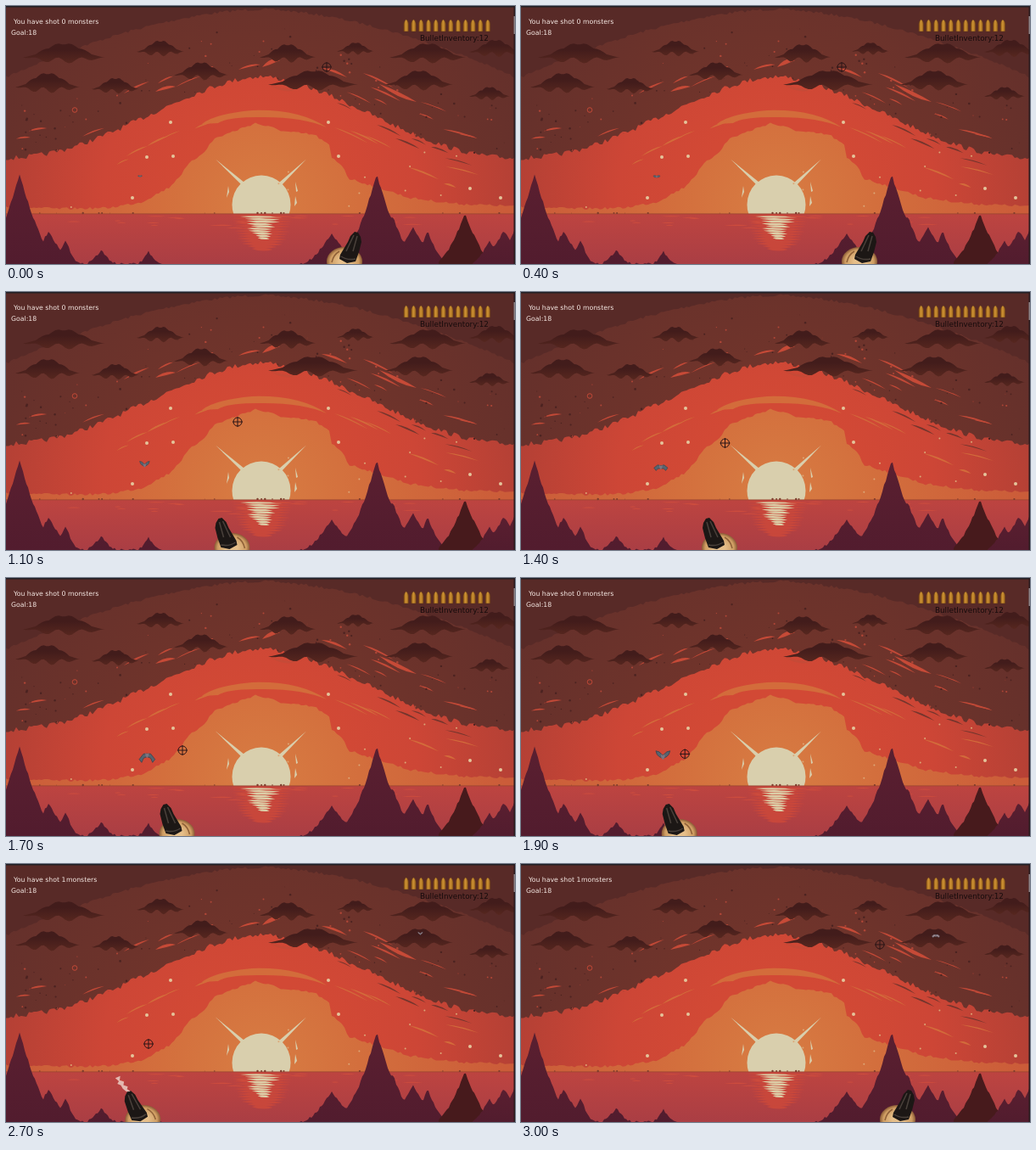
An HTML page that plays this animation: 600 px wide and 304 px high, repeating every 3.1 s.

```html
<!DOCTYPE html>
<html lang="en">
<head>
<meta charset="utf-8">
<title>Sunset shooting game</title>
<style>
html,body{margin:0;width:100%;height:100%;overflow:hidden;background:#5a2c28}
svg{display:block;width:600px;height:304px}
text{font-family:"DejaVu Sans",sans-serif;font-size:7.75px;white-space:pre}
</style>
</head>
<body>
<svg id="stage" viewBox="0 0 600 304">
<defs>
  <radialGradient id="red" gradientUnits="userSpaceOnUse" cx="300" cy="225" r="310">
    <stop offset=".3" stop-color="#d24935"/><stop offset=".6" stop-color="#cd4636"/><stop offset="1" stop-color="#b34035"/>
  </radialGradient>
  <radialGradient id="brown" gradientUnits="userSpaceOnUse" cx="300" cy="225" r="350">
    <stop offset=".4" stop-color="#70342b"/><stop offset="1" stop-color="#64302b"/>
  </radialGradient>
  <radialGradient id="orange" gradientUnits="userSpaceOnUse" cx="300" cy="240" r="290">
    <stop offset="0" stop-color="#d87d43"/><stop offset=".4" stop-color="#d36f3d"/><stop offset="1" stop-color="#cb5c39"/>
  </radialGradient>
  <linearGradient id="sea" x2="0" y2="1">
    <stop offset="0" stop-color="#bd4440"/><stop offset="1" stop-color="#aa3e44"/>
  </linearGradient>
  <linearGradient id="rock" x2="0" y2="1">
    <stop offset="0" stop-color="#5a1f30"/><stop offset="1" stop-color="#521c2e"/>
  </linearGradient>
  <linearGradient id="cloud" x2="0" y2="1">
    <stop offset=".3" stop-color="#421c1b"/><stop offset="1" stop-color="#57271f"/>
  </linearGradient>
  <linearGradient id="brass">
    <stop offset="0" stop-color="#8a5216"/><stop offset=".45" stop-color="#cf9433"/><stop offset="1" stop-color="#98601b"/>
  </linearGradient>
  <radialGradient id="skin">
    <stop offset=".3" stop-color="#e6bf8a"/><stop offset=".8" stop-color="#cf9d62"/><stop offset="1" stop-color="#8a5a35"/>
  </radialGradient>
  <clipPath id="sky"><rect width="600" height="245"/></clipPath>
</defs>
<rect width="600" height="304" fill="#582a27"/>
<g id="scene"></g>
<g id="bat">
  <path id="wings" stroke="#3d444f" stroke-width=".05"/>
  <path d="M-.12-.14L-.05-.06H.05L.12-.14L.12.08L0 .24L-.12.08Z" fill="#7b7580"/>
</g>
<g id="gun">
  <ellipse cx="-1" cy="-3" rx="21" ry="17" fill="url(#skin)"/>
  <path d="M5-15Q12-11 14-2" fill="none" stroke="#8f6038" stroke-width="1.5"/>
  <path d="M-20-32L-17-37L-13-38L-8-33L-5-26L4-11L5-6L-4-1L-14-3L-18-14L-21-26Z" fill="#1c1715"/>
  <path d="M-16-33L-11-15M-12-34L-3-15M-14-6Q-4-4 3-9" fill="none" stroke="#4a413b" stroke-width="1.5"/>
  <path id="smoke" d="M-18-37L-22-41L-24-45L-28-47L-26-50L-30-54L-24-56L-25-51L-20-49L-21-45L-16-43L-17-40L-13-37Z" fill="#e3b9b0"/>
</g>
<g id="aim" fill="none" stroke="#2b1516">
  <circle r="5"/><path d="M-6 0H6M0-6V6"/>
</g>
<g id="ammo"></g>
<text x="9" y="20.5" fill="#f6e9e4">You have shot <tspan id="score">0</tspan><tspan id="unit"> monsters</tspan></text>
<text x="6" y="33.5" fill="#f6e9e4">Goal:18</text>
<text x="488" y="40.5" fill="#180c0d" style="font-size:8.8px">BulletInventory:12</text>
<rect width="600" height="1.5" fill="#202026"/>
<rect x="598.5" width="1.5" height="304" fill="#2b1b1e"/>
<rect x="598.5" y="12" width="1.5" height="21" fill="#8d8285"/>
</svg>
<script>
const $ = id => document.getElementById(id);
const NS = "http://www.w3.org/2000/svg";

function add(tag, attrs, parent = $("scene")) {
  const el = document.createElementNS(NS, tag);
  for (const k in attrs) el.setAttribute(k, attrs[k]);
  return parent.appendChild(el);
}

let seed = 7;
const rnd = () => (seed = (seed * 16807) % 2147483647) / 2147483647;
const between = (a, b) => a + (b - a) * rnd();
const pairs = s => s.split(" ").map(p => p.split(",").map(Number));
const repeat = (n, fn) => { for (let i = 0; i < n; i++) fn(i); };

const poly = (pts, fill) =>
  add("path", {d: "M" + pts.map(p => p.map(v => v.toFixed(1)).join(" ")).join("L") + "Z", fill});
const dot = (x, y, r, fill) => add("circle", {cx: x.toFixed(1), cy: y.toFixed(1), r: r.toFixed(1), fill});

// Area under y(x), closed at the given floor
function under(y, x0, x1, floor, jag, fill, step = 3) {
  const pts = [[x0, floor]];
  for (let x = x0; x <= x1; x += step) pts.push([x, Math.min(floor, y(x) + between(-jag, jag))]);
  pts.push([x1, floor]);
  poly(pts, fill);
}

// Tapered curved stroke
function streak(x, y, u, v, w, fill, bend = 0) {
  const mx = (x + u) / 2, my = (y + v) / 2 + bend;
  add("path", {d: `M${x} ${y}Q${mx} ${my - w} ${u} ${v}Q${mx} ${my + w} ${x} ${y}Z`, fill});
}

const edge = x => 83 + 96 * Math.pow(Math.abs(Math.sin((x - 300) / 600 * Math.PI)), 1.65);

// Streaks that follow the arch, shifted up or down from its edge
function drift(n, x0, x1, lo, hi, fill) {
  repeat(n, () => {
    const x = between(x0, x1), u = x + between(14, 40), off = between(lo, hi);
    streak(x, edge(x) + off, u, edge(u) + off, between(1, 2.5), fill, -2);
  });
}

function cloud(x, y, w) {
  const top = [], base = [], h = Math.min(w, 72);
  for (let k = -1; k <= 1; k += .08) {
    const bell = Math.cos(k * Math.PI / 2);
    top.push([x + k * w / 2, y + h * (.05 - .2 * bell * bell - .04 * bell * Math.abs(Math.sin(k * 9)))]);
    base.unshift([x + k * w / 2, y + h * (.05 + .05 * bell * (1 + Math.sin(k * 11)))]);
  }
  poly(top.concat(base), "url(#cloud)");
}

function drawSky() {
  under(x => 4 + 80 * Math.pow(Math.abs(x - 300) / 300, 1.7), 0, 600, 245, 1.5, "url(#brown)");
  under(edge, 0, 600, 245, 3, "url(#red)");

  const glow = pairs("0,236 60,239 120,238 160,231 192,214 206,199 216,186 234,171 246,156 270,147 294,138 330,148 364,152 382,165 381,177 398,189 403,203 440,214 475,226 530,233 600,236");
  under(x => {
    const i = Math.max(1, glow.findIndex(p => p[0] >= x));
    const [a, b] = glow[i - 1], [c, d] = glow[i];
    return b + (d - b) * (x - a) / (c - a);
  }, 0, 600, 245, 1.5, "url(#orange)");

  add("path", {d: "M231 139Q246 127 290 123Q345 121 378 143Q350 131 305 131Q262 130 250 138Z", fill: "#d36c3b"});
  drift(5, 90, 230, 20, 45, "#d36c3b");
  drift(6, 380, 560, 22, 50, "#d36c3b");
  drift(6, 10, 200, -45, -8, "#c24937");
  drift(8, 400, 560, -45, -6, "#c24937");
  drift(6, 390, 560, 4, 16, "#74352d");

  streak(302, 72, 323, 64, 5, "#c64a37", -4);
  streak(274, 75, 300, 69, 2.5, "#c64a37", -3);
  streak(372, 73, 402, 84, 3, "#c64a37", -3);
  streak(440, 92, 484, 113, 5, "#c64a37", 2);
  streak(176, 101, 200, 95, 3.5, "#c64a37", -3);
  streak(312, 94, 343, 99, 3, "#c64a37", 4);
  add("circle", {cx: 81, cy: 122.5, r: 2.8, fill: "none", stroke: "#c24937"});

  repeat(110, i => {
    const x = between(0, 596);
    dot(x, edge(x) - between(0, 65), between(.4, 1.3), i % 3 ? "#4b2321" : "#b04637");
  });
  pairs("68,97 182,56 332,66 412,44 497,90 577,62").forEach(([x, w], i) => cloud(x, i % 2 ? 51 : 57, w));
  pairs("49,76 129,56 230,64 362,106 487,80 570,48").forEach(([x, w], i) => cloud(x, [92, 95, 78, 89, 89, 104][i], w));
}

function drawSun() {
  add("circle", {cx: 301, cy: 234, r: 34.5, fill: "#d9cfad", "clip-path": "url(#sky)"});
  add("path", {d: "M247 180.5L281 208L278 211ZM354 180.5L322 208L325 211ZM341 207L344 218L342 219ZM262 212L263 219L260 226ZM341 224L343 232L340 236Z", fill: "#d9cfad"});
  pairs("194,137 380,137 166,178 197,177 392,177 149,226 547,215 583,226")
    .forEach(([x, y]) => dot(x, y, 2, "#e4c59b"));
  repeat(12, () => dot(between(70, 560), between(165, 240), 1, "#dca878"));
}

function drawSea() {
  add("rect", {y: 245, width: 600, height: 59, fill: "url(#sea)"});
  add("rect", {y: 244.5, width: 600, height: .8, fill: "#98422f"});
  repeat(22, () => dot(between(0, 596), 244, between(.4, 1.2), "#7d3b2c"));
  repeat(14, i => {
    const half = 38 * Math.sqrt(1 - i * i / 196) * between(.85, 1.05);
    streak(302 - half, 247 + i * 3, 302 + half, 248 + i * 3, 4, "#c8473b");
  });
  repeat(10, i => {
    const half = between(.7, 1.1) * (24 - i * 1.8), x = 303 + between(-5, 5);
    streak(x - half, 248 + i * 2.8, x + half, 249 + i * 2.8, 2.6, "#dccda6");
  });
  repeat(26, () => {
    const x = between(70, 520), y = 247 + 18 * rnd() * rnd();
    streak(x, y, x + between(8, 28), y, 1, "#cf4e3e");
  });
}

// Skyline made of pointed peaks: [x, height, half width]
function ridge(peaks, x0, x1, fill) {
  const high = x => Math.max(...peaks.map(([c, h, w]) => h * Math.pow(Math.max(0, 1 - Math.abs(x - c) / w), 1.6)));
  under(x => 304 - high(x), x0, x1, 304, 1.5, fill, 2);
}

function drawRocks() {
  ridge(pairs("16,106,48 50,38,34 70,28,18 112,16,20 168,15,14"), 0, 184, "url(#rock)");
  ridge(pairs("437,106,48 455,58,34 418,46,36 384,37,36 480,44,34 497,38,24"), 346, 522, "url(#rock)");
  ridge(pairs("541,59,36"), 510, 570, "#471a1c");
  ridge(pairs("570,27,24 587,40,32 600,42,30"), 550, 600, "url(#rock)");
}

drawSky(); drawSun(); drawSea(); drawRocks();

const bullets = Array.from({length: 12}, (_, i) => {
  const x = 468.9 + i * 8.75;
  return add("path", {d: `M${x} 30V21Q${x + .6} 17 ${x + 2.8} 16Q${x + 5} 17 ${x + 5.6} 21V30Z`,
    fill: "url(#brass)", stroke: "#5d3418", "stroke-width": .5}, $("ammo"));
});

const SHOT = 2500, SPENT = 2900, LOOP = 3100;

// time, x, y of the crosshair
const track = [[0, 378, 72], [700, 378, 72], [1100, 273, 153], [1700, 208, 203],
               [2200, 171, 214], [2700, 168, 212], [3000, 423, 95], [LOOP, 423, 95]];

function aimAt(t) {
  const i = track.findIndex(k => k[0] > t);
  const [a, x, y] = track[i - 1], [b, u, v] = track[i];
  const f = (t - a) / (b - a);
  return [x + (u - x) * f, y + (v - y) * f];
}

function drawBat(t, hit) {
  const age = (hit ? t - SHOT : t) / 1000;
  const x = hit ? 488 + age * 2 : 158 + age * 4.9;
  const y = hit ? 81 + age * 6 : 200.5 + 2.6 * age * age;
  const up = Math.cos((t / 1000 - .72) * Math.PI * 5);
  const w = .55 - Math.max(0, up) * .1, tip = -.35 * up, mid = -.16 - .12 * up;
  const wing = s => `M0-.05L${s * .25} ${mid}L${s * w} ${tip}L${s * .38} ${tip + .22}L${s * .25} ${mid + .3}L0 .15Z`;
  $("wings").setAttribute("d", wing(-1) + wing(1));
  $("wings").setAttribute("fill", hit ? "#a58d95" : "#56646f");
  $("bat").setAttribute("transform", `translate(${x} ${y}) scale(${5 + 7 * age})`);
}

const show = (el, on) => el.setAttribute("visibility", on ? "visible" : "hidden");

function draw(ms) {
  const t = Math.floor(ms / 100) * 100;
  const [x, y] = aimAt(t), right = x > 300, hit = t >= SHOT;
  const smoking = hit && t < SPENT && !right;
  $("aim").setAttribute("transform", `translate(${x} ${y})`);
  $("gun").setAttribute("transform",
    `translate(${right ? x + 20 : x - 5.5} 304) scale(${right ? -1 : 1} 1) rotate(${smoking ? -4 : 0})`);
  show($("smoke"), smoking);
  show(bullets[0], t < SPENT);
  $("score").textContent = hit ? "1" : "0";
  $("unit").setAttribute("dx", hit ? -2 : 0);
  drawBat(t, hit);
}

function tick() {
  draw(performance.now() % LOOP);
  requestAnimationFrame(tick);
}
tick();
</script>
</body>
</html>
```
